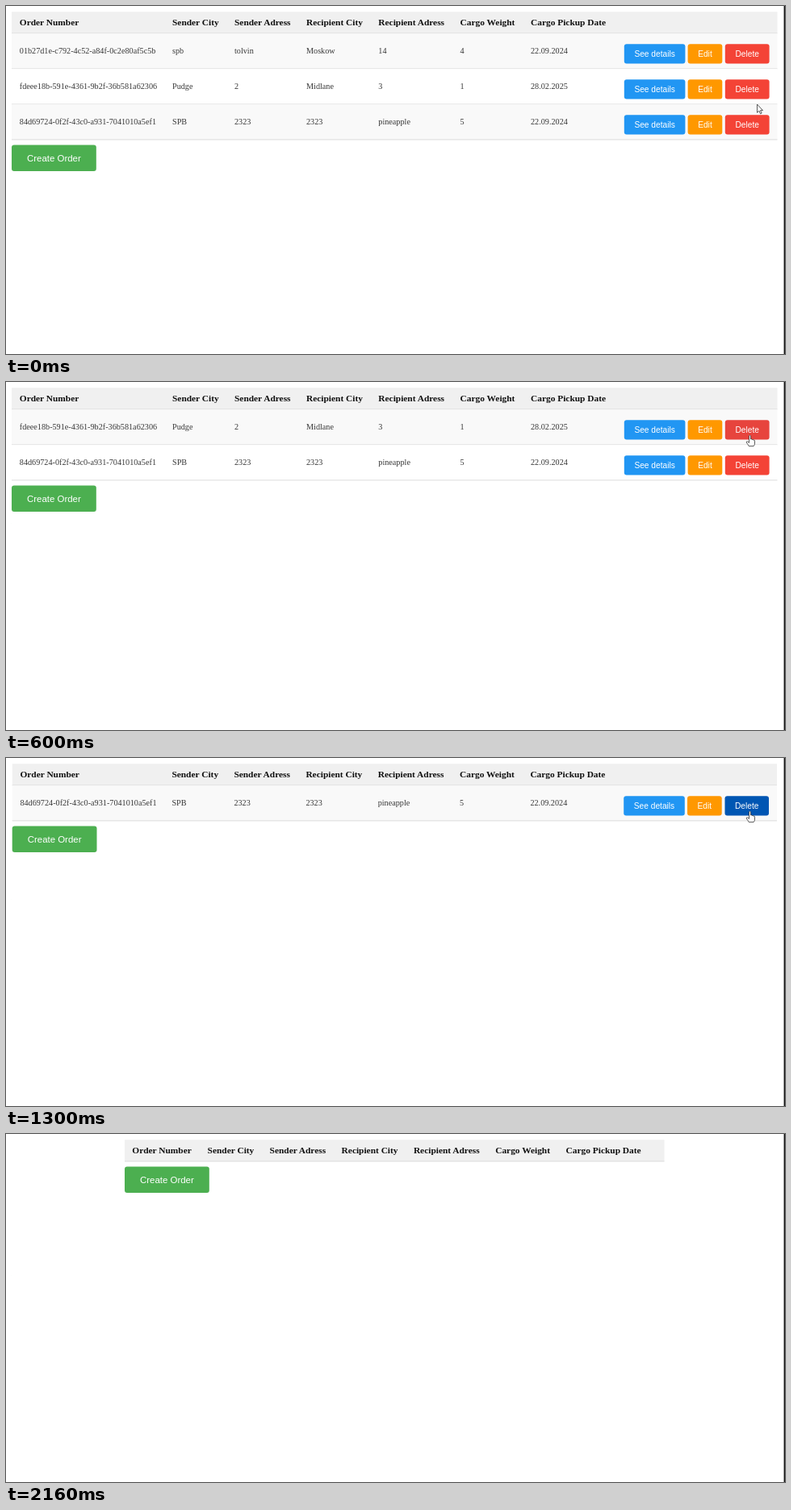
An HTML page for the animation above (2.18 s loop, 965x432 px).

```html
<!DOCTYPE html>
<html lang="en">
<head>
<meta charset="utf-8">
<title>Orders</title>
<style>
  html, body { margin: 0; width: 100%; height: 100%; overflow: hidden; background: #fff; }
  svg { display: block; }
  text { font: 10.2px "Liberation Serif", "Times New Roman", serif; fill: #383838; }
  .head { font-size: 11.4px; font-weight: bold; fill: #111; }
  .label { font: 10.2px "Liberation Sans", Arial, sans-serif; fill: #fff; text-anchor: middle; }
  .big { font-size: 11.45px; }
</style>
</head>
<body>
<svg id="stage" width="965" height="432" viewBox="0 0 965 432"></svg>
<script>
const LOOP = 2180, FADE = 300;
const DELETES = [580, 980, 1420];
const ROW_H = 44, HEAD_BOTTOM = 34.2;
const heads = ["Order Number", "Sender City", "Sender Adress", "Recipient City",
  "Recipient Adress", "Cargo Weight", "Cargo Pickup Date"];
const columns = [16.8, 206, 283, 372, 461.3, 562.6, 650];
const orders = [
  ["01b27d1e-c792-4c52-a84f-0c2e80af5c5b", "spb", "tolvin", "Moskow", "14", "4", "22.09.2024"],
  ["fdeee18b-591e-4361-9b2f-36b581a62306", "Pudge", "2", "Midlane", "3", "1", "28.02.2025"],
  ["84d69724-0f2f-43c0-a931-7041010a5ef1", "SPB", "2323", "2323", "pineapple", "5", "22.09.2024"]
];
// Pointer path: time, x, y
const path = [[0, 930.5, 122], [40, 930.5, 122], [100, 929, 115], [165, 926, 91], [255, 922, 71],
  [290, 921.5, 66], [1430, 921.5, 66], [1640, 887, 8], [1800, 882.5, -8], [1900, 880, -20], [LOOP, 880, -20]];

const clamp = x => Math.min(1, Math.max(0, x));
const rect = (x, y, w, h, fill, r = 0) =>
  `<rect x="${x}" y="${y}" width="${w}" height="${h}" rx="${r}" fill="${fill}"/>`;
const text = (x, y, s, cls = "") => `<text x="${x}" y="${y}" class="${cls}">${s}</text>`;
const button = (x, y, w, h, fill, s, cls = "") =>
  rect(x, y, w, h, fill, 3) + text(x + w / 2, y + h / 2 + 3.7, s, "label " + cls);

// The CSS "ease" curve
function ease(x) {
  if (x <= 0 || x >= 1) return clamp(x);
  const bezier = (s, a, b) => 3 * (1 - s) ** 2 * s * a + 3 * (1 - s) * s * s * b + s ** 3;
  let lo = 0, hi = 1;
  for (let i = 0; i < 20; i++) {
    const mid = (lo + hi) / 2;
    if (bezier(mid, .25, .25) < x) lo = mid; else hi = mid;
  }
  return bezier(lo, .1, 1);
}

function pointerAt(t) {
  const i = path.findIndex(p => p[0] > t);
  const [t0, x0, y0] = path[i - 1], [t1, x1, y1] = path[i];
  const k = (t - t0) / (t1 - t0);
  return [x0 + (x1 - x0) * k, y0 + (y1 - y0) * k];
}

// How far the Delete button in a table slot has faded to its hover colour
function hover(slot, t, gone) {
  if (slot === 0) return ease((t - (gone ? DELETES[gone - 1] : 255)) / FADE);
  if (slot > 1 || gone) return 0;
  return t < 165 ? ease((t - 100) / FADE)
    : ease(65 / FADE) * (1 - ease((t - 165) / 120));
}

function deleteColor(k) {
  const to = [0, 86, 179];
  return `rgb(${[244, 67, 54].map((c, i) => Math.round(c + (to[i] - c) * k))})`;
}

function table(t, gone) {
  const rows = orders.slice(gone);
  const single = rows.length === 1, empty = !rows.length;
  const left = empty ? 147 : single ? 7.7 : 7;
  const right = empty ? 815.5 : single ? 955 : 955.5;
  const columnX = i => columns[i] + (empty ? 139.6 + (i ? 4 : 0) - (i ? 4 : 0) : 0);
  const nudge = single ? -.6 : 0;
  // An empty table has a narrower first column
  const textX = i => empty ? (i ? columns[i] + 43.6 : 156.3) : i ? columnX(i) + nudge : columnX(0) - nudge;
  const line = y => rect(left, y - .8, right - left, 1, "#ddd");

  let out = rect(left, 7.2, right - left, HEAD_BOTTOM - 7.2, "#f0f0f0") + line(HEAD_BOTTOM);
  heads.forEach((s, i) => out += text(textX(i), 23.8, s, "head"));
  rows.forEach((row, slot) => {
    const y = HEAD_BOTTOM + slot * ROW_H, top = y + 13;
    out += rect(left, y, right - left, ROW_H, slot % 2 ? "#fff" : "#f9f9f9") + line(y + ROW_H);
    row.forEach((s, i) => out += text(textX(i), y + 25.2, s));
    out += button(765.8 + nudge, top, 75.6, 24.3, "#2196f3", "See details")
      + button(844.6 + nudge, top, 42.7, 24.3, "#ff9800", "Edit")
      + button(890.8 + nudge / 2, top, 54.8 + nudge / 2, 24.3, deleteColor(hover(slot, t, gone)), "Delete");
  });
  const bottom = HEAD_BOTTOM + rows.length * ROW_H;
  return out + button(left, bottom + 6.4, 104.8, 32.4, "#4caf50", "Create Order", "big");
}

function pointer(t, gone) {
  const [x, y] = pointerAt(t);
  const slot = Math.floor((y - HEAD_BOTTOM) / ROW_H), inside = y - HEAD_BOTTOM - slot * ROW_H;
  const onButton = slot >= 0 && slot < orders.length - gone && inside > 13 && inside < 37.3;
  const shape = onButton
    ? "M-1 .8Q0-.6 1 .8V5Q2.4 4.4 2.8 5.5Q4.2 5 4.5 6.1Q5.9 5.8 6 7.2V10Q6 12 4.7 13.6H-1.3Q-2.2 11.6-4.2 9.2Q-4.6 7.6-3 7.9L-1 9.4Z"
    : "M0 0V10.3L2.4 8.2L4 11.8L5.6 11.1L4 7.6H7Z";
  return `<path transform="translate(${x} ${y})" d="${shape}" fill="#fff" stroke="#333" stroke-width=".8" stroke-linejoin="round"/>`;
}

const stage = document.getElementById("stage");
function draw(now) {
  const t = now % LOOP, gone = DELETES.filter(d => t >= d).length;
  stage.innerHTML = table(t, gone) + rect(963.6, 0, 1.4, 432, "#111") + pointer(t, gone);
  requestAnimationFrame(draw);
}
draw(performance.now());
</script>
</body>
</html>
```
